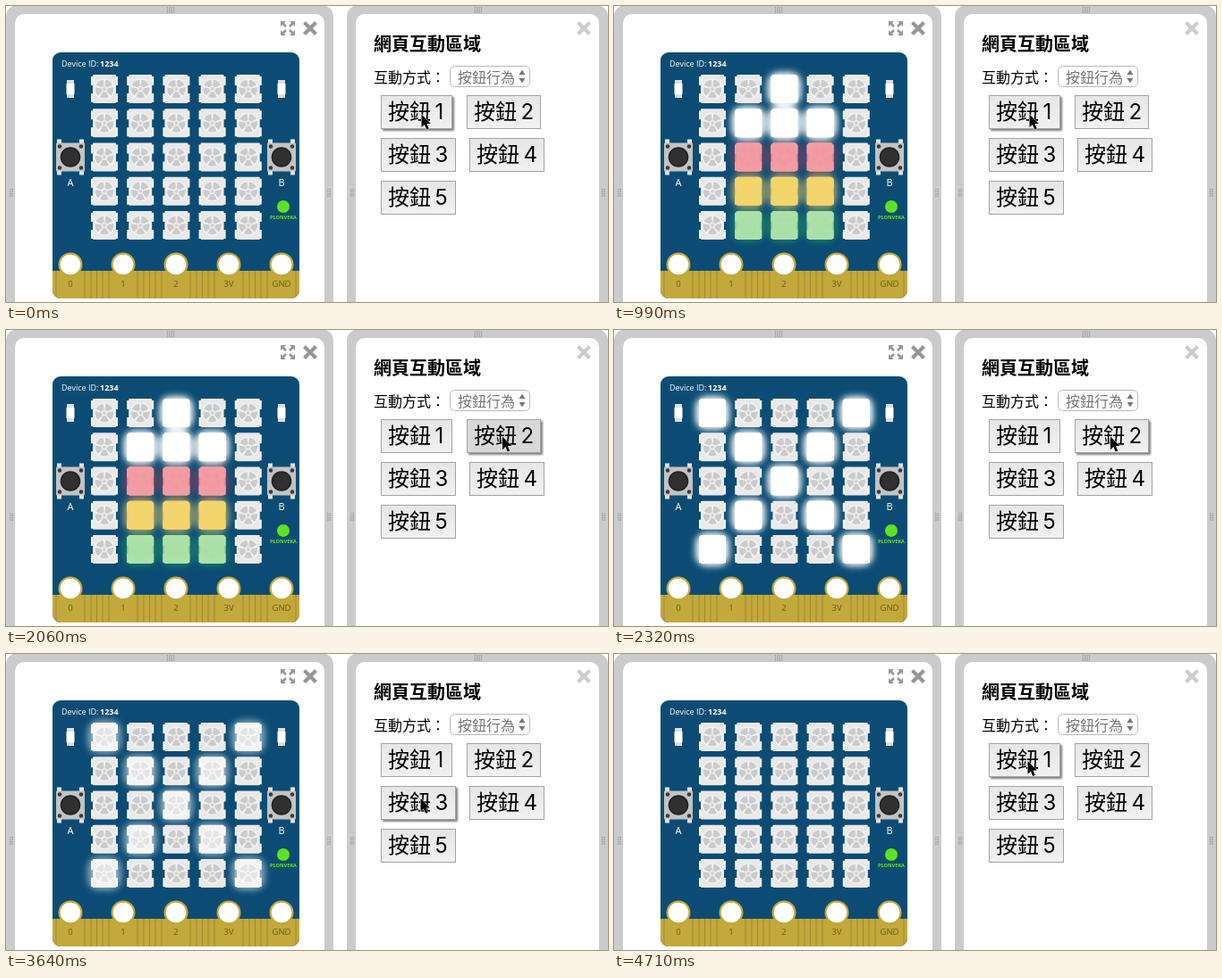
An HTML page that plays this animation: 673 by 332 pixels, repeating every 5.52 s.

```html
<!DOCTYPE html>
<html lang="zh-Hant">
<head>
<meta charset="utf-8">
<title>Board buttons</title>
<style>
html, body { margin: 0; width: 100%; height: 100%; overflow: hidden; background: #fff; }
svg { display: block; width: 673px; height: 332px; }
text { font-family: Inter, "Noto Sans CJK TC", "Noto Sans CJK JP", "Noto Sans CJK", sans-serif; }
.board text { font-family: "Open Sans", "Noto Sans", sans-serif; }
</style>
</head>
<body>
<svg id="stage" viewBox="0 0 673 332" xmlns="http://www.w3.org/2000/svg">
  <defs>
    <linearGradient id="face" x2="0" y2="1">
      <stop stop-color="#e6e6e6"/><stop offset="1" stop-color="#f1f1f1"/>
    </linearGradient>
    <filter id="glow" x="-60%" y="-60%" width="220%" height="220%"><feGaussianBlur stdDeviation="3.6"/></filter>
    <filter id="soft" x="-20%" y="-30%" width="140%" height="160%"><feGaussianBlur stdDeviation="1.3"/></filter>
    <clipPath id="card"><rect x="52" y="52" width="276" height="276" rx="9"/></clipPath>
    <g id="led">
      <path d="M-15-14h30v10h-30zM-15 5h30v10h-30z" fill="#f3f3f3"/>
      <rect x="-13" y="-16" width="26" height="32" rx="1" fill="#e9e9e9"/>
      <circle r="11.5" fill="#f2f2f2"/>
      <circle r="6.8" fill="none" stroke="#cbcbcb" stroke-width="7" pathLength="50" stroke-dasharray="8 2" transform="rotate(-83)"/>
      <circle r="2" fill="#d2d2d2"/>
    </g>
    <g id="push">
      <path d="M-15-20h5v40h-5zM10-20h5v40h-5z" fill="#e2e2e2"/>
      <rect x="-16" y="-16" width="32" height="32" rx="1" fill="#c3c3c3"/>
      <g fill="#3b3b3b">
        <circle cx="-12" cy="-12" r="2.3"/><circle cx="12" cy="-12" r="2.3"/>
        <circle cx="-12" cy="12" r="2.3"/><circle cx="12" cy="12" r="2.3"/>
      </g>
      <circle r="11.3" fill="#242424"/><circle r="9.5" fill="#303030"/>
    </g>
    <g id="sensor">
      <rect x="-4" y="-10" width="8" height="20" fill="#dedede"/>
      <rect x="-4.5" y="-6" width="9" height="12" fill="#fff"/>
    </g>
  </defs>
  <rect width="673" height="332" fill="#fff"/>
  <g id="panels"></g>

  <g fill="#999">
    <g id="expand" transform="translate(315 25)"></g>
  </g>
  <g fill="none" stroke-width="4.2">
    <path d="M333.5 18.5l13 13m0-13l-13 13" stroke="#969696"/>
    <path d="M639.5 18.5l13 13m0-13l-13 13" stroke="#ccc"/>
  </g>

  <g class="board">
    <g clip-path="url(#card)">
      <rect x="52" y="52" width="276" height="276" fill="#0c4c74"/>
      <rect x="52" y="297" width="276" height="31" fill="#c3a83b"/>
      <g id="pins"></g>
    </g>
    <text x="62" y="68" font-size="9" fill="#fff">Device ID:</text>
    <text x="105" y="68" font-size="9" font-weight="700" fill="#fff">1234</text>
    <use href="#sensor" x="72" y="93"/><use href="#sensor" x="308" y="93"/>
    <use href="#push" x="72" y="169.5"/><use href="#push" x="308" y="169.5"/>
    <g font-size="11" fill="#fff" text-anchor="middle">
      <text x="72" y="202">A</text><text x="308" y="202">B</text>
    </g>
    <circle cx="310" cy="225" r="7" fill="#5ee322"/>
    <text x="310" y="239" font-size="5.6" font-weight="700" fill="#5ee322" text-anchor="middle">PLONVEKA</text>
    <g id="leds"></g>
    <g id="arrow"></g>
    <g id="cross"></g>
  </g>

  <text x="411" y="50" font-size="20" font-weight="700">網頁互動區域</text>
  <text x="411" y="86" font-size="16">互動方式：</text>
  <rect x="496.5" y="67.5" width="89" height="23" rx="5" fill="#fff" stroke="#b9b9b9"/>
  <text x="505" y="86" font-size="16" fill="#777">按鈕行為</text>
  <path d="M573.5 77l3.5-5.5 3.5 5.5zM573.5 81l3.5 5.5 3.5-5.5z" fill="#777"/>
  <g id="buttons"></g>
  <path id="cursor" d="M0 0V14.8L3.4 11.6 5.7 17 8.2 15.9 5.9 10.6H10.4Z" fill="#000" stroke="#fff" stroke-width="1" paint-order="stroke"/>
</svg>
<script>
const NS = 'http://www.w3.org/2000/svg';
const LOOP = 5520;
const $ = id => document.getElementById(id);

function add(parent, tag, attrs, text) {
  const el = document.createElementNS(NS, tag);
  for (const k in attrs) el.setAttribute(k, attrs[k]);
  if (text) el.textContent = text;
  parent.appendChild(el);
  return el;
}

// Window frames with their drag grips
function grip(cx, cy, cols, rows) {
  for (let i = 0; i < cols; i++)
    for (let j = 0; j < rows; j++)
      add($('panels'), 'rect', {
        x: cx + (i - (cols - 1) / 2) * 2.4 - .6, y: cy + (j - (rows - 1) / 2) * 2.4 - .6,
        width: 1.2, height: 1.2, fill: '#858585'
      });
}
for (const [x, w] of [[0, 366], [381, 292]]) {
  add($('panels'), 'rect', { x, y: -1, width: w, height: 360, rx: 13, fill: '#cbcbcb' });
  add($('panels'), 'rect', { x: x + 10, y: 9, width: w - 20, height: 350, rx: 10, fill: '#fff' });
  grip(x + w / 2 + 1, 4.5, 4, 3);
  grip(x + 6, 209.5, 2, 4);
  grip(x + w - 5, 209.5, 2, 4);
}
for (let a = 0; a < 360; a += 90)
  add($('expand'), 'path', { d: 'M-8-8h6l-2 2 3 3-2 2-3-3-2 2z', transform: `rotate(${a})` });

// Edge connector
['0', '1', '2', '3V', 'GND'].forEach((name, i) => {
  const x = 72 + i * 59, g = $('pins');
  for (const dx of [-16, 16, 23, 29.5, 36])
    add(g, 'rect', { x: x + dx - .5, y: 297, width: 1, height: 31, fill: '#a18a2c' });
  add(g, 'circle', { cx: x, cy: 290, r: 13.5, fill: '#c3a83b' });
  add(g, 'circle', { cx: x, cy: 290, r: 11.3, fill: '#fff' });
  add(g, 'text', { x, y: 314.5, 'font-size': 9.5, fill: '#6a5a1c', 'text-anchor': 'middle' }, name);
});

// LED matrix: fill, fill opacity, glow colour, glow opacity
const LIGHT = {
  w: ['#fff', 1, '#fff', .95],
  r: ['#f39ba2', .9, '#e23a50', .38],
  y: ['#f4d56c', .96, '#f0cf63', .6],
  g: ['#aee2a9', .88, '#1fae5c', .45]
};
const ledX = c => 110 + c * 40.2;
const ledY = r => 93 + r * 38.25;
for (let r = 0; r < 5; r++)
  for (let c = 0; c < 5; c++) add($('leds'), 'use', { href: '#led', x: ledX(c), y: ledY(r) });

function paint(id, rows) {
  const halos = add($(id), 'g', { filter: 'url(#glow)' });
  const cores = add($(id), 'g', {});
  rows.forEach((row, r) => [...row].forEach((ch, c) => {
    if (!LIGHT[ch]) return;
    const [fill, alpha, halo, haloAlpha] = LIGHT[ch], x = ledX(c), y = ledY(r);
    add(halos, 'rect', { x: x - 19, y: y - 19, width: 38, height: 38, rx: 13, fill: halo, opacity: haloAlpha });
    add(cores, 'rect', { x: x - 15, y: y - 16, width: 30, height: 32, rx: 4, fill, opacity: alpha });
  }));
}
paint('arrow', ['..w..', '.www.', '.rrr.', '.yyy.', '.ggg.']);
paint('cross', ['w...w', '.w.w.', '..w..', '.w.w.', 'w...w']);

// Page buttons
const buttons = [[419, 100, 80], [515, 100, 83], [419, 148, 84], [518, 148, 84], [419, 196, 84]]
  .map(([x, y, w], i) => {
    const g = $('buttons');
    const shadow = add(g, 'rect', { x: x + 2, y: y + 2, width: w, height: 38, fill: '#000', opacity: .5, filter: 'url(#soft)' });
    const face = add(g, 'rect', { x: x + .5, y: y + .5, width: w - 1, height: 37, stroke: '#a3a3a3' });
    add(g, 'text', { x: x + 8, y: y + 27, 'font-size': 24 }, '按鈕');
    add(g, 'text', { x: x + 60.5, y: y + 27.3, 'font-size': 24 }, String(i + 1));
    return { x, y, w, shadow, face };
  });

// Pointer hops: start, end, step count, destination
const START = [464.5, 121.5];
const MOVES = [
  [1440, 1700, 4, [555, 119.5]],
  [2590, 3020, 6, [463.5, 162]],
  [4180, 4710, 7, [462.5, 120]]
];
const PRESSES = [[720, 900, 0], [2060, 2320, 1], [3470, 3640, 2]];

function pointer(t) {
  let pos = START;
  for (const [t0, t1, n, to] of MOVES) {
    if (t < t0) break;
    const k = Math.min(n, 1 + Math.floor((t - t0) / (t1 - t0) * (n - 1) + 1e-6)) / n;
    const e = k * k * (3 - 2 * k);
    pos = pos.map((v, i) => v + (to[i] - v) * e);
  }
  return pos;
}

function render(t) {
  const [px, py] = pointer(t);
  $('cursor').setAttribute('transform', `translate(${px} ${py})`);
  const press = PRESSES.find(p => t >= p[0] && t < p[1]);
  buttons.forEach((b, i) => {
    const over = px >= b.x && px < b.x + b.w && py >= b.y && py < b.y + 38;
    b.shadow.setAttribute('visibility', over ? 'visible' : 'hidden');
    b.face.setAttribute('fill', press && press[2] === i ? '#d8d8d8' : 'url(#face)');
  });
  $('arrow').setAttribute('opacity', t < 900 || t >= 2320 ? 0 : t < 990 ? .5 : 1);
  $('cross').setAttribute('opacity', t < 2320 || t >= 3730 ? 0 : t < 3640 ? 1 : .5);
}

const begin = performance.now();
function tick() {
  render((performance.now() - begin) % LOOP);
  requestAnimationFrame(tick);
}
tick();
</script>
</body>
</html>
```
